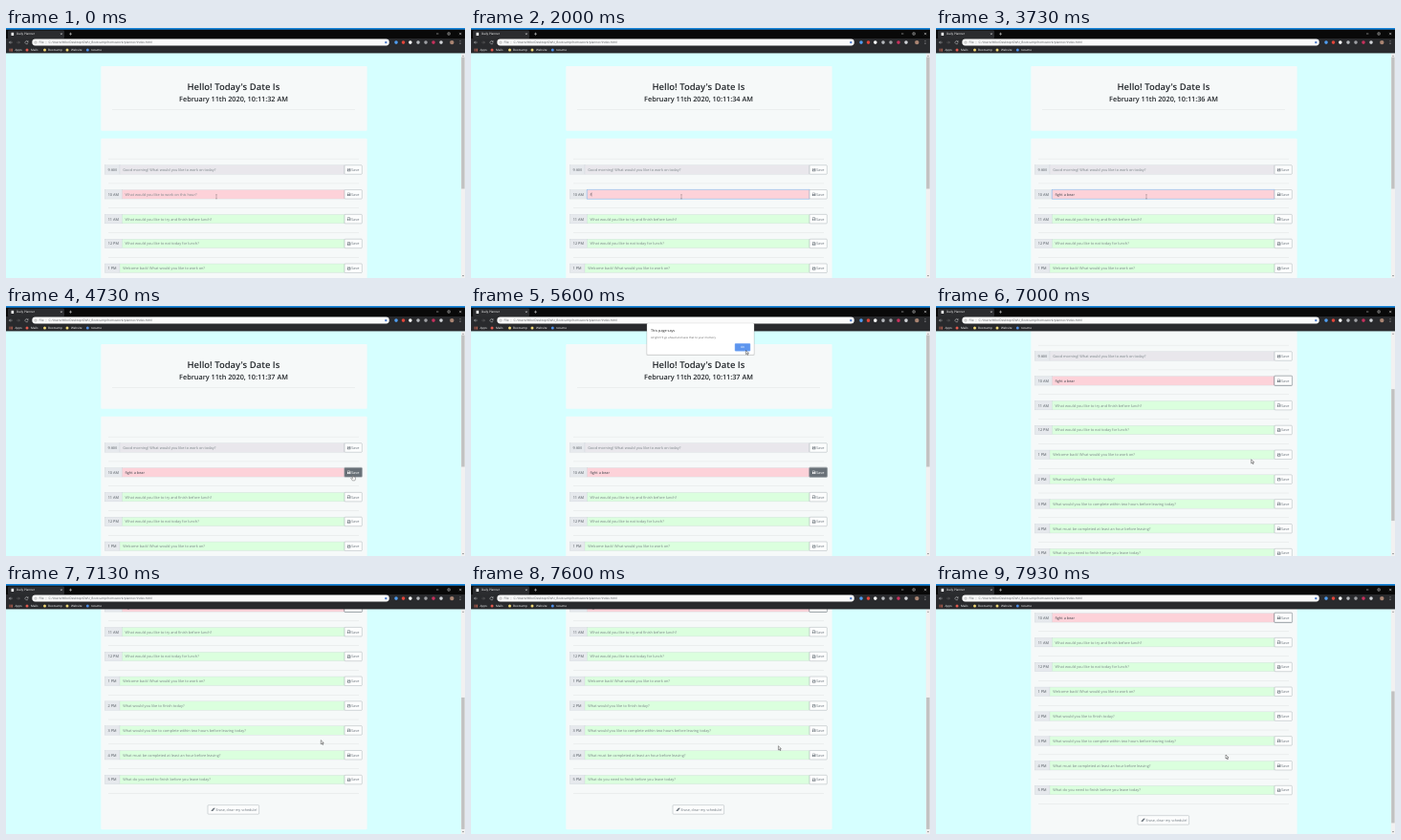
An HTML page for the animation above (8000 ms loop, 480 px wide and 262 px high).

```html
<!DOCTYPE html>
<html lang="en">
<head>
<meta charset="utf-8">
<title>Daily Planner</title>
<style>
html, body { margin: 0; width: 100%; height: 100%; overflow: hidden; background: #d6ffff; }
svg { display: block; width: 100vw; height: 100vh; }
text { font-family: "Open Sans", "Noto Sans", sans-serif; font-size: 3.85px; text-rendering: geometricPrecision; white-space: pre; }
.mid { text-anchor: middle; }
.heading { font-weight: 600; fill: #212529; text-anchor: middle; }
.hint { fill: #7b8488; }
.tag { fill: #495057; }
.typed { fill: #3c4148; }
.ui { fill: #fff; font-size: 3.1px; }
.address { fill: #55585c; font-size: 3.28px; }
.button rect { fill: #fcfdfd; stroke: #8a9197; stroke-width: .35; }
.button text, .button .icon { fill: #6c757d; }
.button .icon { fill-rule: evenodd; }
</style>
</head>
<body>
<svg id="stage" viewBox="0 0 480 262" preserveAspectRatio="none"></svg>
<script>
const LOOP = 8000, STEP = 1000 / 15;
const ROW_TOP = 148.5, PITCH = 25.82, BAR_TOP = 30.5, BAR_SCALE = 227 / 385;

const rows = [
  ['9 AM', 'Good morning! What would you like to work on today?', '#e9e7ec'],
  ['10 AM', 'What would you like to work on this hour?', '#fdd2d9'],
  ['11 AM', 'What would you like to try and finish before lunch?'],
  ['12 PM', 'What would you like to eat today for lunch?'],
  ['1 PM', 'Welcome back! What would you like to work on?'],
  ['2 PM', 'What would you like to finish today?'],
  ['3 PM', 'What would you like to complete within two hours before leaving today?'],
  ['4 PM', 'What must be completed at least an hour before leaving?'],
  ['5 PM', 'What do you need to finish before you leave today?']
];

const rect = (x, y, w, h, fill, extra = '') =>
  `<rect x="${x}" y="${y}" width="${w}" height="${h}" fill="${fill}" ${extra}/>`;
const text = (x, y, value, cls = '', extra = '') =>
  `<text x="${x}" y="${y}" class="${cls}" ${extra}>${value}</text>`;
const dot = (x, y, r, fill) => `<circle cx="${x}" cy="${y}" r="${r}" fill="${fill}"/>`;
const stroke = (d, color = '#dfe1e5', width = .45) =>
  `<path d="${d}" fill="none" stroke="${color}" stroke-width="${width}"/>`;
const rule = (x, y, w) => rect(x, y, w, .4, '#000', 'opacity=".11"');

function row([time, hint, color = '#dbffde'], i) {
  const y = ROW_TOP + i * PITCH, top = y - 4.75;
  const left = time.length > 4 ? 121.4 : 119;
  const active = i === 1;
  return rule(107, y - 11.6, 262) +
    rect(103.2, top, left - 103.2, 9.5, '#e6e9ed', 'stroke="#ced4da" stroke-width=".35"') +
    text((103.2 + left) / 2, y + 1.4, time, 'tag mid') +
    (active ? rect(left - .3, top - .3, 354.6 - left, 10.1, 'none', 'id="ring" rx=".8" stroke="#8fc0f8" stroke-width=".8"') : '') +
    rect(left, top, 354 - left, 9.5, color, 'stroke="#ced4da" stroke-width=".35"') +
    (active ? rect(left, top, 354 - left, 9.5, 'none', 'id="edge" stroke="#86b8f0" stroke-width=".4"') : '') +
    text(left + 3.2, y + 1.4, hint, 'hint', active ? 'id="hint"' : '') +
    (active ? text(left + 3.2, y + 1.4, '', 'typed', 'id="typed"') +
      rect(left + 3.2, y - 2, .3, 4.2, '#444', 'id="caret"') : '') +
    (active ? rect(353.7, top - .4, 18.9, 10.3, 'none', 'id="saveRing" rx="1" stroke="#6c757d" stroke-opacity=".6" stroke-width=".9"') : '') +
    `<g class="button" ${active ? 'id="save"' : ''}>` +
    rect(354, top, 18.3, 9.5, '#fff', 'rx=".8"') +
    `<path class="icon" d="M357 ${y - 1.6}h2.6l.7.7v2.6h-3.3zM357.4 ${y - 1.2}v1h2v-1zM357.9 ${y + .2}v1.1h1.4v-1.1z"/>` +
    text(361, y + 1.4, 'Save') + '</g>';
}

function page() {
  return rect(99.3, 40, 278.3, 67.8, '#f6f9f9', 'rx="1"') +
    text(237.9, 65.2, "Hello! Today's Date Is", 'heading', 'style="font-size:9.5px"') +
    text(238, 77.2, '', 'heading', 'id="clock" style="font-size:7.27px"') +
    rule(111, 85, 254) +
    rect(99.3, 115.7, 278.3, 291.5, '#f6f9f9', 'rx="1"') +
    rows.map(row).join('') +
    rule(107, ROW_TOP + rows.length * PITCH - 11.6, 262) +
    '<g class="button">' + rect(211, 381.7, 53.6, 9.5, '#fff', 'rx=".8"') +
    '<path class="icon" d="M214.5 387.6l2.5-2.8h1.9l-2.6 3.2h-1.6z"/>' +
    text(219.4, 387.9, 'Erase, clear my schedule!', '', 'style="font-size:3.7px"') + '</g>';
}

function browser() {
  const bookmarks = [[22, 26, 'Mails', '#e25a4e'], [40.5, 44, 'Bootcamp', '#f0d674'],
    [64, 68, 'Website', '#f0d674'], [85.3, 89, 'resume', '#4d8fe8']];
  const extensions = [[408, '#4f9df0'], [415.5, '#e0453a'], [422.8, '#fff'], [431, '#b5b8bc'],
    [439, '#9d9fa3'], [447, '#c8305c'], [455, '#d0d3d7']];
  return rect(0, 0, 480, 26.4, '#292a2d') +
    rect(0, 0, 480, 11, '#090909') + rect(0, 0, 480, 1.7, '#1482d8') +
    rect(2, 2.4, 59, 9, '#2b2c2f', 'rx="1.4"') +
    rect(5.5, 4.8, 2.6, 3.2, '#f4f4f4') + text(11, 7.4, 'Daily Planner', 'ui') +
    stroke('M57 5.3l1.8 1.8m0-1.8l-1.8 1.8M66 6.2h3m-1.5-1.5v3', '#fff') +
    stroke('M450 6h2.4M462 4.9h2.2v2.2h-2.2zM474 4.9l2.3 2.3m0-2.3l-2.3 2.3', '#fff') +
    stroke('M6.6 15.1H3.4m1.4-1.4l-1.4 1.4 1.4 1.4') +
    stroke('M11.2 15.1h3.2m-1.4-1.4l1.4 1.4-1.4 1.4', '#777') +
    stroke('M22.9 14.3a1.6 1.6 0 1 0 .2 1.3m0-2.3v1.3h-1.3') +
    rect(27.3, 11.6, 373.5, 6.9, '#fafafa', 'rx="3.4"') +
    '<circle cx="31" cy="15.1" r="1.2" fill="none" stroke="#666" stroke-width=".35"/>' +
    text(34.5, 16.2, 'File', 'address') + rect(41.8, 13.6, .3, 3, '#aaa') +
    text(44.5, 16.2, 'C:/Users/Milo/Desktop/GWU_Bootcamp/homework/planner/index.html', 'address') +
    dot(397.3, 15.1, 1.2, '#4a78c8') +
    extensions.map(([x, color]) => dot(x, 15.1, 1.8, color)).join('') +
    dot(466.3, 15.1, 2.2, '#a98472') +
    [13.7, 15.1, 16.5].map(y => dot(475, y, .4, '#fff')).join('') +
    [0, 1, 2].map(i => rect(3.6 + i * 1.2, 21.6, .7, 3, '#d36c58')).join('') +
    text(9.6, 24.1, 'Apps', 'ui') +
    bookmarks.map(([x, tx, label, color]) => dot(x, 23.1, 1.5, color) + text(tx, 24.1, label, 'ui')).join('');
}

function scrollbar() {
  return rect(475.8, 26.4, 4.2, 236, '#f1f1f1') +
    rect(476.2, BAR_TOP, 3.4, 138, '#c1c1c1', 'id="thumb"') +
    '<path d="M477 29.6l1-1.2 1 1.2zM477 259.3l1 1.2 1-1.2z" fill="#666"/>';
}

function dialog() {
  return '<g id="dialog">' +
    rect(183.4, 18.3, 113.2, 33.8, '#000', 'rx="1" opacity=".12"') +
    rect(184, 17.9, 112, 33.2, '#fff', 'rx="1" stroke="#bbb" stroke-width=".3"') +
    text(188, 27, 'This page says', '', 'fill="#222" style="font-size:3.75px"') +
    text(188, 34.1, "Alright! I'll go ahead and save that to your memory", '', 'fill="#666" style="font-size:2.9px"') +
    rect(276, 39.3, 16, 7.9, '#5d95ee', 'id="ok" rx=".8" stroke="#8db6f6" stroke-width=".5"') +
    text(284, 44.4, 'OK', 'mid', 'fill="#fff" style="font-size:3px"') + '</g>';
}

const pointers =
  '<g id="pointer">' +
  `<g id="beam">${stroke('M-.8-2.1h1.6M0-2.1v4.2M-.8 2.1h1.6', '#444', .3)}</g>` +
  '<path id="hand" d="M-.4 0h.8v2l2 .5v2.2l-.6 1.2h-2.5l-1.6-2.5.5-.5 1.4.8z" fill="#fff" stroke="#222" stroke-width=".35"/>' +
  '<path id="arrow" d="M0 0v4.1l1-.9.7 1.6.7-.3-.7-1.6h1.3z" fill="#fff" stroke="#111" stroke-width=".4"/></g>';

const stage = document.getElementById('stage');
stage.innerHTML = rect(0, 0, 480, 262, '#d6ffff') +
  `<g id="page">${page()}</g>` + scrollbar() + browser() + dialog() + pointers;

const el = Object.fromEntries([...stage.querySelectorAll('[id]')].map(node => [node.id, node]));
const saveBox = el.save.querySelector('rect');
const saveInk = [...el.save.querySelectorAll('text, .icon')];

const scrollKeys = [[6800, 0], [6870, 8], [6930, 38], [7000, 96], [7070, 139], [7130, 150],
  [7800, 150], [7870, 146.5], [7930, 139]];
const pointerX = [[3800, 220], [4070, 272], [4270, 345], [4400, 388], [4600, 365], [4670, 363],
  [5130, 363], [5330, 338], [5600, 287.5], [6130, 287.5], [6600, 324.3], [6870, 330], [7130, 329.3], [7500, 327], [7930, 303]];
const pointerY = [[3800, 176.8], [4070, 186], [4270, 192], [4400, 189], [4600, 177], [4670, 177],
  [5130, 177], [5330, 112], [5600, 46.5], [6130, 46.5], [6600, 110], [6870, 158], [7130, 163.7], [7500, 167], [7930, 179]];
const phrase = 'fight a bear';
const keyTimes = [2000, 2130, 2200, 2270, 2400, 2530, 2670, 2800, 2870, 3070, 3200, 3270];

function tween(keys, t) {
  const next = keys.findIndex(([time]) => time > t);
  if (next === 0) return keys[0][1];
  if (next < 0) return keys[keys.length - 1][1];
  const [t0, a] = keys[next - 1], [t1, b] = keys[next];
  return a + (b - a) * (t - t0) / (t1 - t0);
}
const fade = (t, inAt, inEnd, outAt, outEnd) =>
  tween([[inAt, 0], [inEnd, 1], [outAt, 1], [outEnd, 0]], t);
const mix = (a, b, p) => `rgb(${a.map((v, i) => Math.round(v + (b[i] - v) * p))})`;
const show = (node, on) => node.setAttribute('opacity', +on);

// The open dialog blocks the page clock.
const secondsAt = t => t >= 4930 && t < 6130 ? 37 : 32 + Math.floor((t + 670) / 1000);

function caretOn(t) {
  if (t < 1000 || t >= 4670) return false;
  const reset = Math.max(1000, ...keyTimes.filter(time => time <= t));
  return Math.floor((t - reset + 40) / 500) % 2 === 0;
}

function draw(t) {
  const scroll = tween(scrollKeys, t);
  el.page.setAttribute('transform', `translate(0 ${-scroll})`);
  el.thumb.setAttribute('y', BAR_TOP + scroll * BAR_SCALE);
  el.clock.textContent = `February 11th 2020, 10:11:${secondsAt(t)} AM`;

  const count = keyTimes.filter(time => time <= t).length;
  el.typed.textContent = phrase.slice(0, count);
  show(el.hint, count === 0);
  show(el.caret, caretOn(t));
  el.caret.setAttribute('x', 124.6 + (count ? el.typed.getComputedTextLength() : 0));

  const focus = fade(t, 930, 1130, 4600, 4730);
  show(el.ring, focus * .5);
  show(el.edge, focus);

  const hover = fade(t, 4530, 4670, 6130, 6270);
  saveBox.style.fill = mix([252, 253, 253], [104, 112, 119], hover);
  saveInk.forEach(node => node.style.fill = mix([108, 117, 125], [255, 255, 255], hover));
  show(el.saveRing, tween([[4670, 0], [4800, 1]], t));

  show(el.dialog, t >= 4930 && t < 6130 ? tween([[4930, .6], [5000, 1]], t) : 0);
  el.ok.setAttribute('fill', t >= 5870 ? '#4a82da' : '#5d95ee');

  el.pointer.setAttribute('transform', `translate(${tween(pointerX, t)} ${tween(pointerY, t)})`);
  const beam = t < 3930, hand = t >= 4530 && t < 5200;
  show(el.beam, beam);
  show(el.hand, hand);
  show(el.arrow, !beam && !hand);
}

const start = performance.now();
function frame() {
  const t = (performance.now() - start) % LOOP;
  draw(Math.round(Math.floor((t + 4) / STEP) * STEP / 10) * 10 % LOOP);
  requestAnimationFrame(frame);
}
frame();
</script>
</body>
</html>
```
